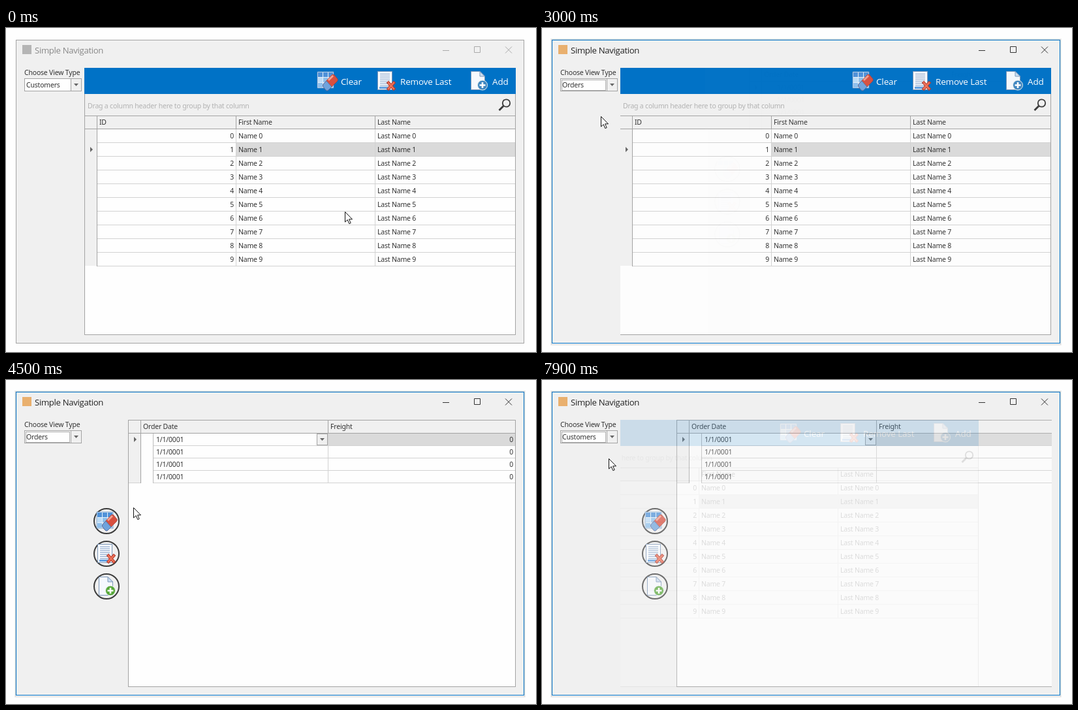
These frames come from a looping animation (812 px wide and 496 px high, 8 s). An HTML page:

```html
<!DOCTYPE html>
<html lang="en">
<head>
<meta charset="utf-8">
<title>Simple Navigation</title>
<style>
html, body { margin: 0; width: 100%; height: 100%; overflow: hidden; background: #fefefe; }
svg { display: block; width: 812px; height: 496px; }
text { font: 10.5px "Noto Sans", sans-serif; letter-spacing: -.2px; fill: #333; white-space: pre; }
.title { font: 13.2px "Open Sans", sans-serif; letter-spacing: -.34px; }
.tool { font: 13.5px "Open Sans", sans-serif; letter-spacing: -.15px; fill: #fff; }
.hint { fill: #b2b2b2; }
.end { text-anchor: end; }
</style>
</head>
<body>
<svg id="stage" viewBox="0 0 812 496"></svg>
<script>
const LINE = '#a3a3a3', SOFT = '#d2d2d2', FACE = '#f0f0f0', SELECTED = '#dadada';

const box = (x, y, w, h, fill, more = '') =>
  `<rect x="${x}" y="${y}" width="${w}" height="${h}" fill="${fill}" ${more}/>`;
const hline = (x1, x2, y, c = LINE) => box(x1, y, x2 - x1, 1, c);
const vline = (x, y1, y2, c = LINE) => box(x, y1, 1, y2 - y1, c);
const frame = (x, y, w, h, fill, stroke = LINE, more = '') =>
  box(x + .5, y + .5, w - 1, h - 1, fill, `stroke="${stroke}" ${more}`);
const text = (x, y, s, cls = '', more = '') => `<text x="${x}" y="${y}" class="${cls}" ${more}>${s}</text>`;
const path = (d, more) => `<path d="${d}" ${more}/>`;
const at = (x, y, s) => `<g transform="translate(${x} ${y})">${s}</g>`;
const down = (x, y, more = 'fill="#666"') => path(`M${x} ${y}h7l-3.5 4z`, more);
const range = (n, f) => Array.from({ length: n }, (_, i) => f(i)).join('');

// 32 x 32 command icons
function clearIcon() {
  const cell = i => box(2 + i % 3 * 8, 3 + Math.floor(i / 3) * 8, 7, 7, i < 3 ? '#4f91d8' : i % 2 ? '#bcdcf6' : '#8fc0ec');
  return box(1, 2, 25, 25, '#e4f0fb', 'stroke="#5583b8" stroke-width=".7"') + range(9, cell) +
    path('M10 21L23 7Q25 5 27 7L32 13Q33 15 31 17L18 30Q16 32 14 30L10 25Q9 23 10 21Z', 'fill="#d8503f" stroke="#a93d35" stroke-width=".7"') +
    path('M10 21L15 16L23 25L18 30Q16 32 14 30L10 25Q9 23 10 21Z', 'fill="#6fa3dc" stroke="#416ea8" stroke-width=".7"') +
    path('M17 14L24 7L26 9L19 16Z', 'fill="#f2a08f"');
}
function removeIcon() {
  return box(2.5, 1.5, 22, 28, '#f8fbff', 'stroke="#7d97b8"') +
    range(7, i => hline(6, 21, 5 + i * 3, '#7f9cc4')) + box(5, 25, 13, 3, '#5f9ee0') +
    path('M19 19L27 28M27 19L19 28', 'stroke="#b83a2c" stroke-width="4.6" stroke-linecap="square"') +
    path('M19 19L27 28M27 19L19 28', 'stroke="#ec7258" stroke-width="2.6" stroke-linecap="square"');
}
function addIcon(color) {
  return path('M4.5 1.5H18L25.5 9V29.5H4.5Z', 'fill="#f6f9fe" stroke="#7d97b8"') +
    path('M18 1.5V9H25.5Z', 'fill="#cddff2" stroke="#7d97b8"') +
    `<circle cx="22" cy="22.5" r="7.5" fill="${color}" stroke="#e8f1ee"/>` +
    path('M22 18v9M17.5 22.5h9', 'stroke="#fff" stroke-width="2.6"');
}

function customers() {
  const top = i => 155 + i * 21;
  const row = i => hline(140, 780, top(i) + 20, SOFT) +
    text(349, top(i) + 14, i, 'end') + text(356, top(i) + 14, 'Name ' + i) + text(569, top(i) + 14, 'Last Name ' + i);
  return box(120, 61, 661, 409, FACE) + box(120, 61, 661, 40, '#0072c6') +
    at(476, 65, clearIcon()) + text(513, 87, 'Clear', 'tool') +
    at(567, 65, removeIcon()) + text(604, 87, 'Remove Last', 'tool') +
    at(708, 65, addIcon('#3f86c0')) + text(745, 87, 'Add', 'tool') +
    text(125, 123, 'Drag a column header here to group by that column', 'hint') +
    '<circle cx="766.5" cy="115" r="5.7" fill="none" stroke="#3a3a3a" stroke-width="1.8"/>' +
    path('M762 119.5L755.5 126', 'stroke="#3a3a3a" stroke-width="2.8"') +
    box(121, 155, 659, 314, '#fefefe') + box(121, 155, 18, 209, FACE) + box(353, 176, 427, 20, SELECTED) +
    range(10, row) + vline(352, 155, 365, SOFT) + vline(565, 155, 365, SOFT) +
    hline(120, 781, 134) + hline(120, 781, 154) + vline(139, 135, 365) + vline(352, 135, 155) + vline(565, 135, 155) +
    vline(120, 101, 470) + vline(780, 101, 470) + hline(120, 781, 469) +
    path('M129 182v8l4-4z', 'fill="#666"') +
    text(143, 148, 'ID') + text(356, 148, 'First Name') + text(569, 148, 'Last Name');
}

function orders() {
  const row = i => hline(225, 780, 100 + i * 19, SOFT) +
    text(230, 95 + i * 19, '1/1/0001') + text(777, 95 + i * 19, '0', 'end');
  const button = (y, icon) =>
    `<circle cx="154" cy="${y}" r="19" fill="${FACE}" stroke="#3c3c3c" stroke-width="2"/>` + at(138, y - 16, icon);
  return box(120, 61, 661, 409, FACE) +
    button(216, clearIcon()) + button(266, removeIcon()) + button(316, addIcon('#57a738')) +
    frame(187, 61, 594, 409, '#fefefe') + box(188, 62, 592, 19, FACE) + box(188, 82, 18, 75, FACE) +
    box(494, 82, 286, 18, SELECTED) + range(4, row) + hline(188, 206, 157, SOFT) +
    hline(187, 781, 81) + vline(206, 62, 158) + vline(225, 82, 158, '#bcbcbc') + vline(493, 62, 82) + vline(493, 82, 158, SOFT) +
    frame(476, 82, 17, 18, FACE) + down(481, 89) + path('M196 87v8l4-4z', 'fill="#666"') +
    text(210, 75, 'Order Date') + text(497, 75, 'Freight');
}

function popup() {
  const names = ['None', 'Customers', 'Orders'];
  return box(26, 97, 92, 48, '#000', 'opacity=".04"') + frame(28, 97, 88, 46, '#fefefe') +
    box(29, 112, 86, 15, '#e1e1e1', 'id="hot"') + names.map((s, i) => text(32, 109 + i * 15, s)).join('');
}

document.getElementById('stage').innerHTML =
  '<defs><clipPath id="area"><rect x="120" y="61" width="661" height="409"/></clipPath></defs>' +
  box(0, 0, 812, 496, '#fefefe') +
  `<g id="glow">${range(2, i => frame(13 + i, 16 + i, 783 - 2 * i, 470 - 2 * i, 'none', '#000', `opacity="${.06 + i * .08}"`))}</g>` +
  frame(15, 18, 779, 465, FACE, LINE, 'id="edge"') + box(25, 26, 14, 14, '#e9b06e', 'id="mark"') +
  text(44, 39, 'Simple Navigation', 'title', 'id="title"') +
  `<g id="controls" fill="none">${path('M669 34.5h10M717.5 28.5h9v9h-9zM765 28.5l10 10M775 28.5l-10 10', '')}</g>` +
  text(28, 72, 'Choose View Type') + frame(28, 77, 88, 20, '#fefefe') +
  frame(99, 77, 17, 20, FACE, LINE, 'id="drop"') + down(104, 85, 'id="arrow"') + text(31, 91, '', '', 'id="value"') +
  frame(30, 79, 68, 17, 'none', '#555', 'stroke-dasharray="1 1" id="focus"') +
  `<g id="views" clip-path="url(#area)"><g id="customers">${customers()}</g><g id="orders">${orders()}</g></g>` +
  `<g id="popup">${popup()}</g>` +
  path('M.5 .5V16L4.2 12.6L6.8 18.6L9.2 17.6L6.6 11.8H11.5Z', 'id="cursor" fill="#fff" stroke="#111"');

const el = {};
document.querySelectorAll('[id]').forEach(n => el[n.id] = n);
const set = (n, k, v) => n.setAttribute(k, v);
const show = (n, on) => set(n, 'visibility', on ? 'visible' : 'hidden');
const smooth = x => (x = Math.min(1, Math.max(0, x)), x * x * (3 - 2 * x));

// time, x, y of the pointer
const moves = [
  [200, 519, 281], [1100, 102, 135], [1500, 109, 91], [2100, 109, 91], [2200, 103, 97], [2600, 90, 134],
  [2900, 90, 134], [3400, 90, 140], [3800, 89, 153], [4200, 89, 153], [4500, 195, 195], [4600, 195, 195],
  [5500, 144, 138], [6100, 117, 91], [6300, 117, 91], [6600, 111, 91], [6900, 111, 91], [7300, 102, 120]
];
function pointer(t) {
  const i = moves.findIndex(m => m[0] > t);
  if (i === 0) return moves[0].slice(1);
  if (i < 0) return moves[moves.length - 1].slice(1);
  const [a, b] = [moves[i - 1], moves[i]], k = smooth((t - a[0]) / (b[0] - a[0]));
  return [1, 2].map(j => Math.round(a[j] + (b[j] - a[j]) * k));
}

const SLIDE = 131, SLIDE_MS = 1070;
function place(view, x, alpha) {
  set(view, 'transform', `translate(${x} 0)`);
  set(view, 'opacity', alpha);
  show(view, alpha > 0);
}
function render(t) {
  const active = t >= 1500, back = t >= 7640;
  const open = t >= 1500 && t < 3000 || t >= 6600 && t < 7700;
  show(el.glow, active);
  set(el.edge, 'stroke', active ? '#0072c6' : LINE);
  set(el.mark, 'fill', active ? '#e9b06e' : '#b5b5b5');
  el.title.style.fill = active ? '#222' : '#888';
  set(el.controls, 'stroke', active ? '#333' : '#aaa');

  el.value.textContent = t >= 3000 && t < 7700 ? 'Orders' : 'Customers';
  show(el.focus, t >= 3000 && !open);
  show(el.popup, open);
  set(el.drop, 'fill', open ? '#a9a9a9' : FACE);
  set(el.drop, 'stroke', open ? '#777' : LINE);
  set(el.arrow, 'fill', open ? '#111' : '#666');
  const onOrders = t >= 2500 && t < 7200;
  set(el.hot, 'y', onOrders ? 127 : 112);

  // the incoming view slides and fades in above the outgoing one
  const p = back ? 1 - smooth((t - 7640) / SLIDE_MS) : smooth((t - 2940) / SLIDE_MS);
  const shift = Math.round(SLIDE * p);
  place(el.customers, -shift, 1 - p);
  place(el.orders, SLIDE - shift, p);
  const upper = back ? el.customers : el.orders;
  if (el.views.lastChild !== upper) el.views.append(upper);

  set(el.cursor, 'transform', `translate(${pointer(t)})`);
}

const start = performance.now();
function tick() {
  const t = (performance.now() - start) % 8000;
  render(Math.floor(t / 100) * 100);
  requestAnimationFrame(tick);
}
tick();
</script>
</body>
</html>
```
